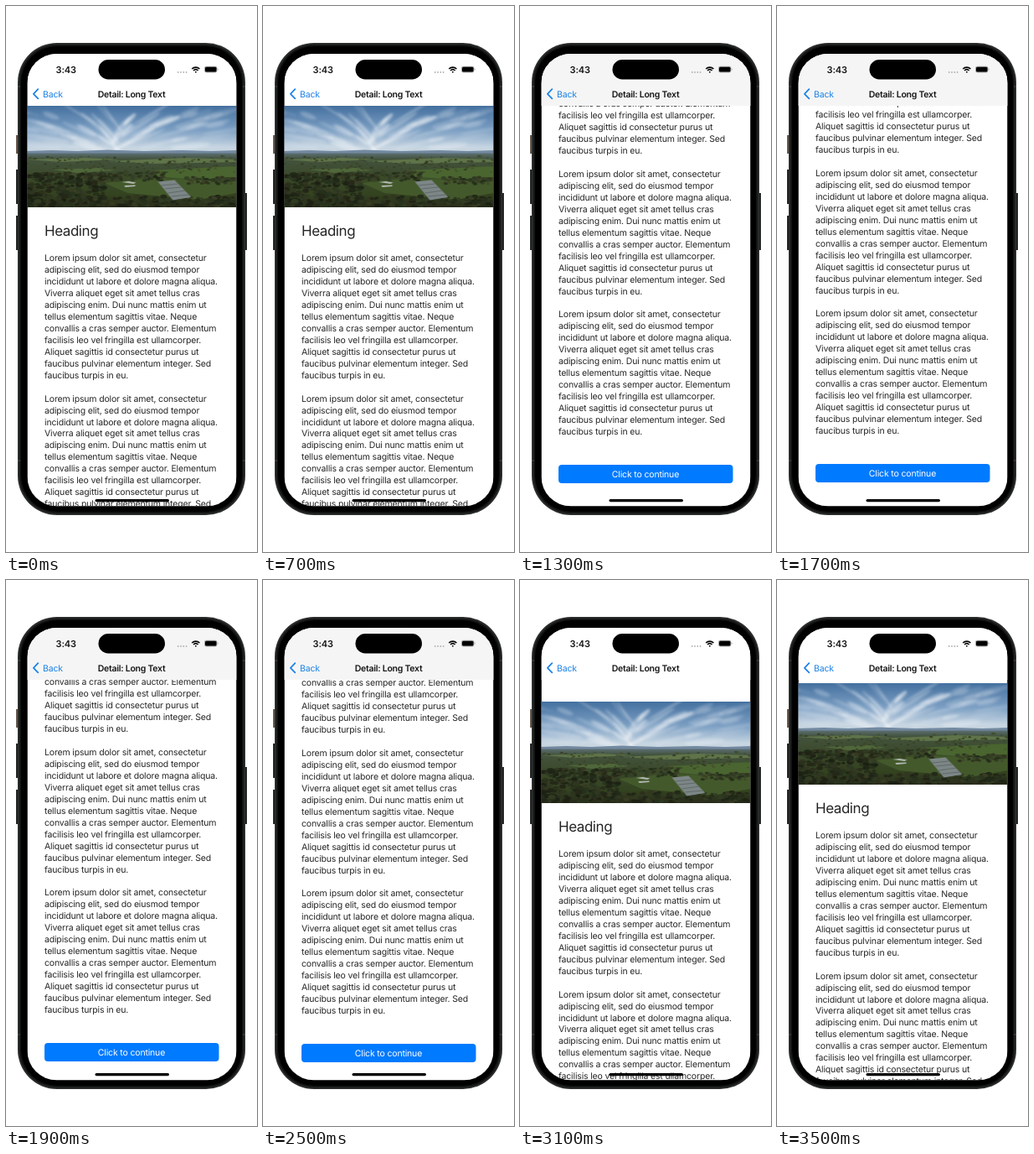
These frames come from a looping animation (300 by 651 pixels, 3700 ms). An HTML page:

```html
<!DOCTYPE html>
<html lang="en">
<head>
<meta charset="utf-8">
<title>Scrolling detail screen</title>
<style>
  html, body { margin: 0; height: 100%; overflow: hidden; background: #fff; }
  svg { display: block; width: 100%; height: 100%; }
  text {
    font-family: Inter, Roboto, sans-serif;
    font-size: 10.5px;
    letter-spacing: -.165px;
    text-rendering: geometricPrecision;
    fill: #262626;
  }
  .heading { font-size: 17px; letter-spacing: -.45px; }
  .bold { font-weight: 600; fill: #151515; }
  .mid { text-anchor: middle; }
  .title { letter-spacing: -.25px; }
  .clock { font-size: 11px; letter-spacing: -.1px; }
  .back { fill: #1a82e6; }
  .label { fill: #fff; }
</style>
</head>
<body>
<svg viewBox="0 0 300 651">
  <defs>
    <linearGradient id="sky" x2="0" y2="1">
      <stop offset="0" stop-color="#44709f"/>
      <stop offset=".5" stop-color="#7c9fc3"/>
      <stop offset=".85" stop-color="#c6d5e2"/>
      <stop offset="1" stop-color="#c9d5de"/>
    </linearGradient>
    <linearGradient id="land" x2="0" y2="1">
      <stop offset="0" stop-color="#5d6f72"/>
      <stop offset=".1" stop-color="#43533f"/>
      <stop offset=".4" stop-color="#3b4a2a"/>
      <stop offset=".75" stop-color="#33421f"/>
      <stop offset="1" stop-color="#29281c"/>
    </linearGradient>
    <filter id="haze" x="-20%" y="-20%" width="140%" height="140%">
      <feGaussianBlur stdDeviation="1.7"/>
    </filter>
    <filter id="soft">
      <feGaussianBlur stdDeviation=".5"/>
    </filter>
    <filter id="frost" filterUnits="userSpaceOnUse" x="-20" y="-20" width="340" height="300">
      <feGaussianBlur stdDeviation="11"/>
    </filter>
    <clipPath id="screen"><rect x="25.5" y="57" width="250" height="539.3" rx="35"/></clipPath>
    <clipPath id="bar"><rect x="25.5" y="57" width="250" height="62"/></clipPath>
    <clipPath id="frame"><rect width="250" height="121"/></clipPath>

    <g id="picture" transform="translate(25.5 119)" clip-path="url(#frame)">
      <rect width="250" height="58" fill="url(#sky)"/>
      <g id="clouds" fill="#fff" filter="url(#haze)"/>
      <g filter="url(#soft)">
        <path d="M-2 54L30 53L60 54L95 52.5L140 54L185 53L220 54L252 53V60H-2Z" fill="#7289a0"/>
        <rect x="-2" y="56.5" width="254" height="67" fill="url(#land)"/>
        <path d="M0 64L70 62L110 64L40 67Z M95 66L190 62L250 64V67L150 69Z" fill="#5f7449"/>
        <path d="M150 77L250 72V85L200 88L150 84Z" fill="#4a6530"/>
        <path d="M92 92L150 86L250 90V104L205 112L120 104Z" fill="#43592b"/>
        <path d="M30 76L85 74L105 77L60 80Z" fill="#50673a"/>
        <g id="trees"/>
        <path d="M113 91L121 90L130 91.5L127 93Z M116 95L129 94.5V96L117 97Z" fill="#b4b9b6"/>
        <path d="M156 90.5L176 88.5L196 109L174 112.5Z" fill="#7d8687"/>
        <path d="M160 95L180 93M164 99L184 97M168 104L189 101M172 108L193 106" stroke="#555f5a" stroke-width=".7"/>
      </g>
    </g>
  </defs>

  <g id="phone">
    <path d="M13 154V176" stroke="#66584d" stroke-width="2"/>
    <path d="M13 195V236M13 250V291M287 223V291" stroke="#232525" stroke-width="2"/>
    <rect x="14" y="44" width="272" height="563" rx="47" fill="#2a2c2c"/>
    <rect x="16" y="46" width="268" height="559" rx="45" fill="#131414"/>
    <rect x="18" y="48" width="264" height="555" rx="43"/>
    <path d="M14 96H17M283 96H286M14 542H17M283 542H286" stroke="#4a4a4a"/>
  </g>

  <g clip-path="url(#screen)">
    <rect x="25.5" y="57" width="250" height="540" fill="#fff"/>
    <g class="scroll">
      <use href="#picture"/>
      <text class="heading" x="46" y="274">Heading</text>
      <g id="copy"></g>
      <rect x="46" y="982" width="208.5" height="22" rx="4" fill="#007aff"/>
      <text class="label mid" x="150" y="996.8">Click to continue</text>
    </g>
    <g clip-path="url(#bar)">
      <rect x="25.5" y="57" width="250" height="62" fill="#fff"/>
      <g id="material">
        <g filter="url(#frost)"><use class="scroll" href="#picture"/></g>
        <rect x="25.5" y="57" width="250" height="62" fill="#f3f3f3" fill-opacity=".77"/>
      </g>
    </g>
    <rect x="106.5" y="588" width="88.5" height="3.2" rx="1.6"/>
  </g>

  <rect x="110.5" y="64" width="79.5" height="23.5" rx="11.75"/>
  <text class="bold clock" x="59.5" y="79.8">3:43</text>
  <g fill="#b0b0b0">
    <circle cx="205.7" cy="79" r=".9"/><circle cx="209" cy="79" r=".9"/>
    <circle cx="212.3" cy="79" r=".9"/><circle cx="215.6" cy="79" r=".9"/>
  </g>
  <g fill="none" stroke="#000" stroke-width="1.6">
    <path d="M222.2 75A6.6 6.6 0 0 1 231.4 75M224 77A4.1 4.1 0 0 1 229.6 77"/>
    <path d="M226 78.7H227.6"/>
  </g>
  <rect x="237" y="71.7" width="15.5" height="7.8" rx="2.4" fill="#aaa"/>
  <rect x="238" y="72.7" width="13.5" height="5.8" rx="1.5"/>
  <path d="M253 74.3Q254.4 75.6 253 76.9Z" fill="#999"/>
  <path d="M38.3 99.2L32.9 104.8L38.3 110.4" fill="none" stroke="#1a82e6" stroke-width="1.7" stroke-linecap="round" stroke-linejoin="round"/>
  <text class="back" x="44" y="108.6">Back</text>
  <text class="bold title mid" x="150" y="108.6">Detail: Long Text</text>
</svg>

<script>
const LOOP = 3700;
const LINE = 13.95;
const PARAGRAPHS = 4;
const LINES = [
  'Lorem ipsum dolor sit amet, consectetur',
  'adipiscing elit, sed do eiusmod tempor',
  'incididunt ut labore et dolore magna aliqua.',
  'Viverra aliquet eget sit amet tellus cras',
  'adipiscing enim. Dui nunc mattis enim ut',
  'tellus elementum sagittis vitae. Neque',
  'convallis a cras semper auctor. Elementum',
  'facilisis leo vel fringilla est ullamcorper.',
  'Aliquet sagittis id consectetur purus ut',
  'faucibus pulvinar elementum integer. Sed',
  'faucibus turpis in eu.'
];
// [time in ms, scroll offset in px], held until the next step
const STEPS = [
  [0, 0], [900, 22], [1100, 65], [1300, 435], [1500, 450], [1700, 436],
  [1900, 430], [2100, 429], [2700, 424], [2900, 112], [3100, -26],
  [3300, -13], [3500, -4]
];

const $ = id => document.getElementById(id);

function add(parent, tag, attrs, content = '') {
  const el = document.createElementNS('http://www.w3.org/2000/svg', tag);
  for (const key in attrs) el.setAttribute(key, attrs[key]);
  el.textContent = content;
  parent.append(el);
}

let seed = 11;
const rnd = (min = 0, max = 1) => {
  seed = (seed * 16807) % 2147483647;
  return min + (max - min) * seed / 2147483647;
};

for (let p = 0; p < PARAGRAPHS; p++) {
  LINES.forEach((line, i) => {
    const row = p * (LINES.length + 1) + i;
    add($('copy'), 'text', { x: 46, y: 304.2 + row * LINE }, line);
  });
}

// Wisps fan out from a point on the horizon
for (let i = 0; i < 75; i++) {
  const cx = rnd(-5, 245);
  const cy = rnd(6, 50);
  const tilt = Math.atan((cy - 62) / (cx - 105)) * 36;
  add($('clouds'), 'ellipse', {
    cx, cy, rx: rnd(8, 30), ry: rnd(.8, 3.4),
    opacity: rnd(.12, .5) * (1 - Math.abs(cx - 105) / 200),
    transform: `rotate(${tilt} ${cx} ${cy})`
  });
}

function trees(count, [x0, x1], [y0, y1], [s0, s1], light) {
  for (let i = 0; i < count; i++) {
    const size = rnd(s0, s1);
    add($('trees'), 'ellipse', {
      cx: rnd(x0, x1), cy: rnd(y0, y1), rx: size * 1.6, ry: size,
      fill: `hsl(${rnd(68, 95)} 26% ${light + rnd(-4, 5)}%)`
    });
  }
}
trees(150, [0, 249], [60, 80], [.5, 1.3], 21);
trees(280, [0, 92], [80, 121], [1.2, 2.8], 14);
trees(190, [60, 249], [108, 121], [1, 2.5], 14);
trees(80, [88, 165], [79, 89], [.8, 1.9], 16);
trees(60, [190, 249], [85, 93], [.8, 1.8], 17);

function play(el, pose) {
  const frames = STEPS.map(([time, y]) => ({ offset: time / LOOP, easing: 'steps(1, end)', ...pose(y) }));
  frames.push({ offset: 1, ...pose(STEPS.at(-1)[1]) });
  el.animate(frames, { duration: LOOP, iterations: Infinity }).startTime = 0;
}

document.querySelectorAll('.scroll').forEach(el => play(el, y => ({ transform: `translateY(${-y}px)` })));
play($('material'), y => ({ opacity: y > 0 ? 1 : 0 }));
</script>
</body>
</html>
```
